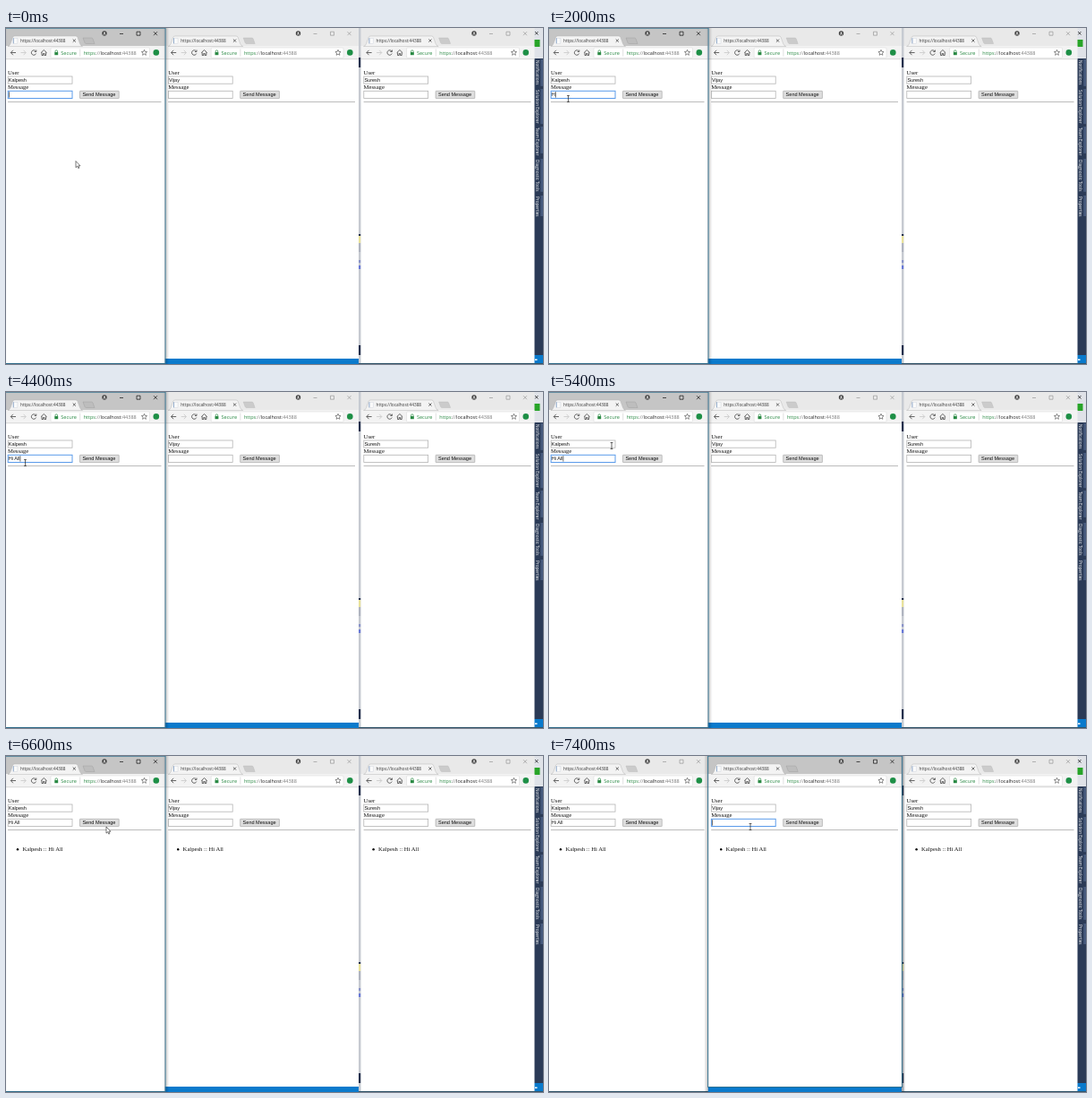
Write an HTML page that moves like this. It is 600 px wide and 375 px high and loops after 8 s.

```html
<!DOCTYPE html>
<html lang="en">
<meta charset="utf-8">
<title>Chat windows</title>
<style>
  html, body { margin: 0; width: 100%; height: 100%; overflow: hidden; background: #fff; }
  svg { display: block; width: 600px; height: 375px; }
  text { white-space: pre; font: 5.56px "Liberation Sans", Arial, sans-serif; fill: #111; }
  .serif { font: 6.67px "Liberation Serif", Times, serif; }
  .ui { font: 4.72px "Open Sans", sans-serif; fill: #333; }
  .url { font-size: 5.5px; fill: #777; }
  .secure { font-size: 5.6px; fill: #2b8a45; }
  .side { font-size: 4.7px; fill: #fff; }
  .bar { fill: #e9e9e9; }
  .active .bar { fill: #c5c5c5; }
  .plus { fill: #cbcbcb; stroke: #b5b5b5; stroke-width: .4; }
  .active .plus { fill: #bdbdbd; stroke: #999; }
  .controls { fill: none; stroke: #999; stroke-width: .7; }
  .active .controls { stroke: #111; }
  .line { fill: none; stroke: #555; stroke-width: .9; }
  .field { fill: #fff; stroke: #b4b4b4; stroke-width: .8; }
  .focus { stroke: #5a9bea; stroke-width: 1; }
  .button { fill: #dedede; stroke: #a9a9a9; stroke-width: .7; }
  .hover { stroke: #888; }
  #shadow { fill: none; stroke: #0003; stroke-width: 3; filter: blur(1px); }
  #frame { fill: none; stroke: #31718f; stroke-width: .9; }
</style>
<svg id="stage" viewBox="0 0 600 375"></svg>
<script>
const DURATION = 8000, STEP = 200;
const SENDER = 'Kalpesh';
const stage = document.getElementById('stage');

// left, right, bottom, content offset, user
const windows = [
  [-1, 177.5, 374, 0, SENDER],
  [178, 394, 369, 179.2, 'Vijay'],
  [396.5, 590.5, 374, 397.6, 'Suresh']
];

const rect = (x, y, w, h, attrs) =>
  `<rect x="${x}" y="${y}" width="${w}" height="${h}" ${attrs}/>`;
const fill = (x, y, w, h, color) => rect(x, y, w, h, `fill="${color}"`);
const text = (x, y, cls, str, attrs = '') =>
  `<text x="${x}" y="${y}" class="${cls}" ${attrs}>${str}</text>`;
const path = (d, attrs = 'class="line"') => `<path d="${d}" ${attrs}/>`;

function browser([left, right, bottom, offset, user]) {
  const edge = right - offset, start = left - offset, width = right - left;
  return `<g class="window" transform="translate(${offset})">
    ${rect(start, 0, width, 20.5, 'class="bar"')}
    ${fill(start, 20, width, 15, '#f3f3f3')}
    ${fill(start, 35, width, bottom - 35, '#fff')}
    ${path(`M${start} 34.7H${edge}`, 'stroke="#c4c4c4" stroke-width=".6"')}
    ${path('M2 20.5Q4 20 5 17.5L7.5 10.5Q8 9 9.5 9H78Q79.5 9 80 10.5L82.5 17.5Q83.5 20 85.5 20.5Z',
      'fill="#f3f3f3" stroke="#aaa" stroke-width=".4"')}
    ${path('M86 11H95.5Q96.5 11 97 12L99 17.5H89.5Q88.5 17.5 88 16.5Z', 'class="plus"')}
    ${rect(8.3, 11.3, 4.5, 6, 'fill="#fafafa" stroke="#d3d8df" stroke-width=".5"')}
    ${path('M8.3 11.3V17.3', 'stroke="#7f9fc5" stroke-width=".8"')}
    ${text(16, 16, 'ui', 'https://localhost:44388')}
    ${path('M74.7 12.5l3.2 3.2m0-3.2l-3.2 3.2', 'stroke="#444" stroke-width=".8"')}
    <g transform="translate(${edge - 67.5} 6)">
      <circle r="2.7" fill="#444"/><circle cy="-.6" r=".9" fill="#eee"/>
      ${path('M-1.5 1.4Q0 0 1.5 1.4', 'stroke="#eee" stroke-width=".8" fill="none"')}
    </g>
    ${path(`M${edge - 50.5} 6.5h4M${edge - 31.5} 4.2h4v4h-4zM${edge - 12.5} 4.2l4 4m0-4l-4 4`, 'class="controls"')}
    ${path('M11 27.5H5.3m2.6-2.7L5.3 27.5l2.6 2.7')}
    ${path('M16.5 27.5h5.7m-2.6-2.7l2.6 2.7-2.6 2.7', 'class="line" style="stroke:#ccc"')}
    ${path('M33.3 26A2.7 2.7 0 1 0 33.6 28.5M33.8 24.5v2h-2')}
    ${path('M39 27.7l3.3-3.2 3.3 3.2M40 27.3v3.2h1.6v-2h1.4v2h1.6v-3.2')}
    ${rect(50, 22, edge - 67, 11.3, 'rx="1" fill="#fff" stroke="#d4d4d4" stroke-width=".5"')}
    ${rect(54.3, 27, 3.9, 3.2, 'fill="#2b8a45"')}
    ${path('M55 27v-1a1.25 1.25 0 0 1 2.5 0v1', 'fill="none" stroke="#2b8a45" stroke-width=".7"')}
    ${text(61.3, 29.6, 'ui secure', 'Secure')}
    ${path('M82.7 23.5v8', 'stroke="#ccc" stroke-width=".6"')}
    ${text(86.7, 29.6, 'ui url', '<tspan fill="#2b8a45">https</tspan>://<tspan fill="#222">localhost</tspan>:44388')}
    ${path(`M${edge - 23} 24.3l.9 2.1 2.2.2-1.7 1.5.5 2.2-1.9-1.2-1.9 1.2.5-2.2-1.7-1.5 2.2-.2z`,
      'fill="none" stroke="#444" stroke-width=".6"')}
    <circle cx="${edge - 9.7}" cy="27.4" r="3.3" fill="#1d8f46"/>
    ${text(2, 52.3, 'serif', 'User')}
    ${rect(2.2, 54, 71.8, 8.2, 'class="field"')}
    ${text(2.8, 60.2, '', user)}
    ${text(2, 68.3, 'serif', 'Message')}
    ${rect(2.2, 70.3, 71.8, 8.2, 'class="field message"')}
    ${text(2.8, 76.4, 'typed', '')}
    ${rect(3, 71.2, .6, 6.4, 'class="caret" fill="#111"')}
    ${rect(82.5, 70.3, 43.7, 8.3, 'class="button" rx=".4"')}
    ${text(85.4, 76.4, '', 'Send Message')}
    ${fill(2, 82, edge - 6, .8, '#aaa')}
    <g class="reply"><circle cx="13" cy="104.2" r="1.2"/>${text(18.4, 106.2, 'serif', SENDER + ' :: Hi All')}</g>
  </g>`;
}

function backdrop() {
  const labels = [['Notifications', 36], ['Solution Explorer', 69], ['Team Explorer', 111],
    ['Diagnostic Tools', 147], ['Properties', 188]];
  return fill(0, 0, 600, 375, '#c6cad1')
    + fill(590, 0, 10, 375, '#2b3b57')
    + fill(590, 0, 10, 34, '#dfe2e8')
    + path('M591 4l3.5 3.5m0-3.5l-3.5 3.5', 'stroke="#222" stroke-width=".8"')
    + fill(590, 13, 6.5, 8, '#28a428')
    + labels.map(([name, y]) => fill(597.3, y - 1, 2.7, name.length * 2.3, '#465a7d')
      + text(0, 0, 'ui side', name, `transform="translate(591.5 ${y}) rotate(90)"`)).join('')
    + fill(590, 365, 10, 10, '#0a7acc') + fill(591, 369.5, 2.5, 1.5, '#fff')
    + fill(394, 33, 2.5, 11, '#25304d') + fill(394, 230, 2.5, 2, '#25304d')
    + fill(394, 232, 2.5, 8, '#e9e29c') + fill(394, 240, 2.5, 10, '#b0b4c0')
    + fill(394, 259, 2.5, 3, '#8a93c8') + fill(394, 265, 2.5, 4, '#6878d6')
    + fill(394, 354, 2.5, 11, '#25304d')
    + fill(0, 374, 600, 1, '#31566b') + fill(177.5, 369, 216.5, 6, '#0a7acc');
}

stage.innerHTML = backdrop() + windows.map(browser).join('')
  + rect(0, -4, 0, 0, 'id="shadow"')
  + rect(0, .2, 0, 0, 'id="frame"')
  + '<g id="pointer">'
  + path('M0 0V7.2L1.7 5.7 2.8 8.1 3.9 7.6 2.8 5.3H5Z', 'id="arrow" fill="#fff" stroke="#222" stroke-width=".6"')
  + path('M-1.4-3.5H1.4M0-3.5V3.5M-1.4 3.5H1.4', 'id="beam" stroke="#222" stroke-width=".7"')
  + '</g>';

// time, x, y, text beam
const moves = [[0, 78, 148.5], [200, 73, 138], [400, 56, 110], [600, 36, 82], [800, 24, 62, 1],
  [1000, 21.5, 79, 1], [5000, 25, 72, 1], [5200, 42, 57, 1], [5400, 70, 60, 1], [5600, 89, 70],
  [5800, 94.7, 74.6], [6600, 112, 79], [6800, 150, 84], [7000, 200, 82], [7200, 225, 79, 1]];
const typing = [[0, ''], [2000, 'H'], [2400, 'Hi'], [3400, 'Hi '], [3800, 'Hi A'], [4200, 'Hi Al'], [4400, 'Hi All']];
const caretOff = [[400, 1000], [1400, 2000], [3000, 3400], [5000, 5400]];

const within = (t, from, to) => t >= from && t < to;
const at = (list, t) => list.filter(item => item[0] <= t).pop();
const byId = id => document.getElementById(id);
const show = (el, on) => el.setAttribute('visibility', on ? 'visible' : 'hidden');
const place = (el, x, w, h) => {
  el.setAttribute('x', x); el.setAttribute('width', w); el.setAttribute('height', h);
};
const panes = [...document.querySelectorAll('.window')];

function draw(t) {
  const active = t < 7400 ? 0 : 1;
  const focused = t < 5800 ? 0 : t < 7400 ? -1 : 1;
  panes.forEach((pane, i) => {
    const find = cls => pane.querySelector('.' + cls);
    const typed = find('typed'), caret = find('caret');
    typed.textContent = i ? '' : at(typing, t)[1];
    pane.classList.toggle('active', i === active);
    find('message').classList.toggle('focus', i === focused);
    find('button').classList.toggle('hover', i === 0 && within(t, 5600, 6600));
    show(find('reply'), t >= 6000);
    show(caret, i === focused && !caretOff.some(([from, to]) => within(t, from, to)));
    caret.setAttribute('x', 3 + (typed.textContent ? typed.getComputedTextLength() : 0));
  });

  const [left, right, bottom] = windows[active];
  place(byId('frame'), left - .4, right - left + 1, bottom + .3);
  place(byId('shadow'), left - 1.5, right - left + 3, bottom + 14);

  const [, x, y, beam] = at(moves, t);
  byId('pointer').setAttribute('transform', `translate(${x} ${y})`);
  show(byId('beam'), beam);
  show(byId('arrow'), !beam);
}

let last = -1;
function tick() {
  const t = Math.floor(performance.now() % DURATION / STEP) * STEP;
  if (t !== last) draw(last = t);
  requestAnimationFrame(tick);
}
tick();
</script>
</html>
```
